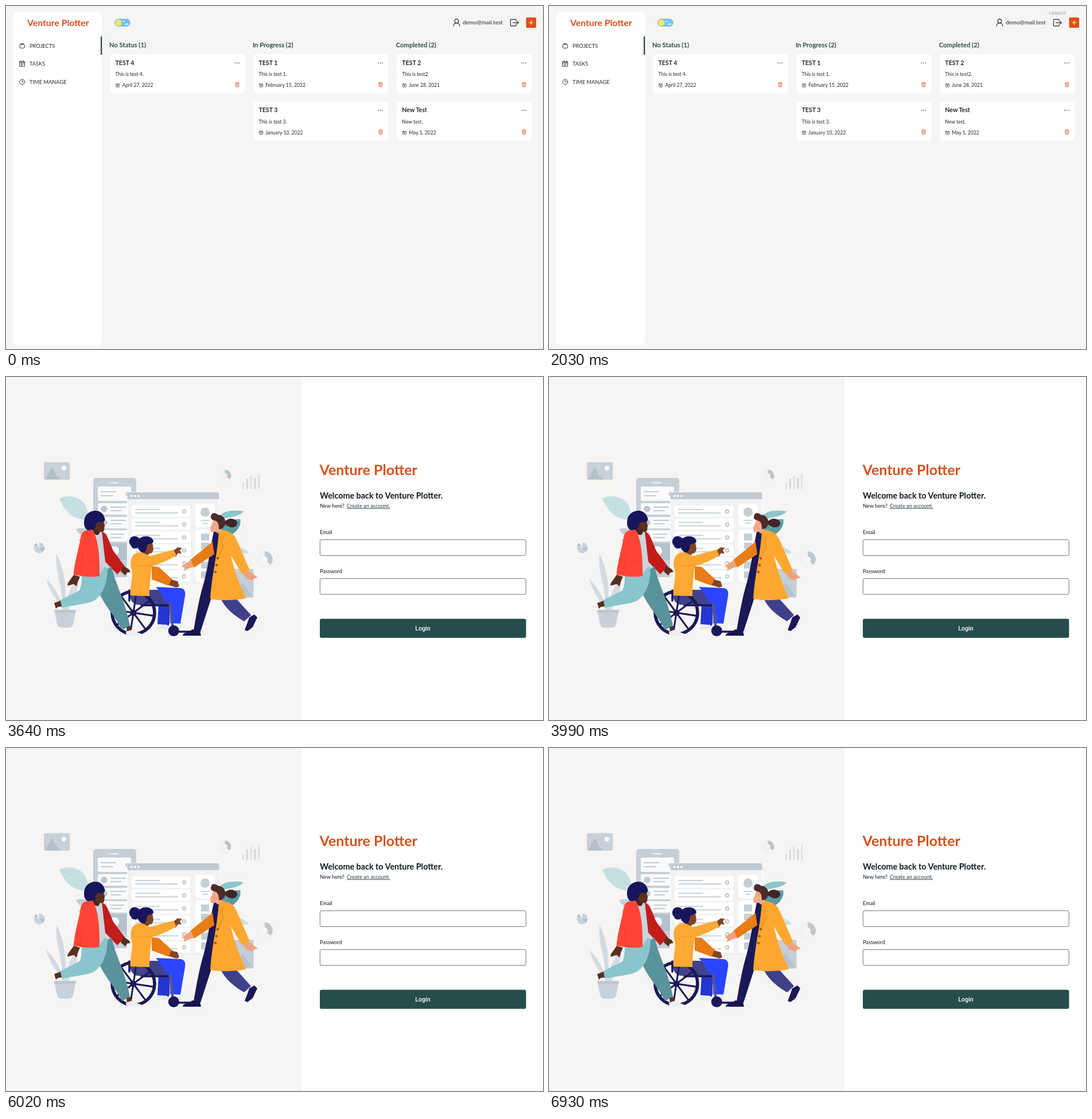
An HTML page that plays this animation: 936x598 px, repeating every 7070 ms.

```html
<!DOCTYPE html>
<html lang="en">
<head>
<meta charset="utf-8">
<title>Venture Plotter</title>
<style>
  html, body { margin: 0; width: 100%; height: 100%; overflow: hidden; background: #f6f5f4; }
  svg { display: block; font-family: Lato, sans-serif; }
  .b { font-weight: 700; }
  .ui { font-family: Roboto, sans-serif; }
  .line { fill: none; stroke-linecap: round; stroke-linejoin: round; }
</style>
</head>
<body>
<svg width="936" height="598" viewBox="0 0 936 598">
  <defs>
    <g id="dots" fill="#4a5258"><circle cx="-3.4" r=".9"/><circle r=".9"/><circle cx="3.4" r=".9"/></g>
    <g id="cal" class="line" stroke="#3c454b" stroke-width=".75">
      <rect x="-3" y="-2.6" width="6" height="5.6" rx=".6"/>
      <path d="M-3-1.2H3M0 0V1.8M-.9.9H.9"/>
    </g>
    <g id="bin" class="line" stroke="#e8634c" stroke-width=".9">
      <path d="M-3.6-2.4H3.6M-1.4-2.6V-4H1.4v1.4M-2.9-2.2L-2.5 4h5l.4-6.2M-1-.6V2.4M1-.6V2.4"/>
    </g>
  </defs>

  <g id="board">
    <rect width="936" height="598" fill="#f6f5f4"/>
    <rect x="12" y="9.5" width="155.3" height="582" rx="9" fill="#fff"/>
    <rect x="165" y="53" width="2.3" height="32" fill="#264c4b"/>
    <text class="b" x="37" y="35" font-size="15.8" fill="#d9501e">Venture Plotter</text>
    <g font-size="9.28" fill="#222b30">
      <text x="41" y="72.5">PROJECTS</text>
      <text x="41" y="104.2">TASKS</text>
      <text x="41" y="135.9">TIME MANAGE</text>
    </g>
    <g class="line" stroke="#2b353a">
      <rect x="24" y="67" width="8.4" height="6.3" rx="1.2"/>
      <path d="M26.2 67v-1.6h4V67"/>
      <path d="M24 96.8h8.4v8.4H24zM24 98.8h8.4M26.2 95.6v2M30.2 95.6v2M26 101h4.4M26 103h3"/>
      <circle cx="28.2" cy="132.4" r="4.4"/>
      <path d="M28.2 129.7v2.9h2.2"/>
    </g>
    <rect x="189.4" y="22.6" width="27" height="13" rx="6.5" fill="#6ec3f8" stroke="#8bb5cc" stroke-width=".7"/>
    <circle cx="196" cy="29.1" r="5.7" fill="#fae36a"/>
    <path d="M203.3 27.4q.3-1.7 1.8-1.3q1.6-.9 2.2 1.3zM207 32.6q.3-1.9 2-1.6q2-1.4 3 .2q1.6 0 1.5 1.4z" fill="#fff"/>
    <g class="line" stroke="#222b30" stroke-width="1.15">
      <circle cx="785.4" cy="26.2" r="3.3"/>
      <path d="M779.9 35q.3-5 5.5-5.3q5.2.3 5.5 5.3M889.2 26v-1.5q0-1.2-1.2-1.2h-7.4q-1.2 0-1.2 1.2v9.2q0 1.2 1.2 1.2h7.4q1.2 0 1.2-1.2V32M883.5 29.1h9.6M890.5 26.6l2.7 2.5-2.7 2.5"/>
    </g>
    <text x="796" y="32.4" font-size="9.95" fill="#222b30">demo@mail.test</text>
    <rect x="906.5" y="20" width="17.5" height="18" rx="2" fill="#e04f14"/>
    <path d="M911.6 29h7.4M915.3 25.3v7.4" stroke="#fff" stroke-width="1.1"/>
    <text id="tip" class="ui" x="871.6" y="15.4" font-size="7.85" fill="#30353a">LOGOUT</text>
    <g id="cols"></g>
  </g>

  <g id="login">
    <rect width="936" height="598" fill="#fff"/>
    <rect width="515" height="598" fill="#f6f5f3"/>

    <!-- backdrop: picture, charts, leaves -->
    <rect x="66" y="148.5" width="45.3" height="30.5" rx="2" fill="#c8d1d9"/>
    <path d="M68 178.500L80 157l11 21.500zM84 178.500l5-6 6 6z" fill="#b3bfca"/>
    <circle cx="101" cy="159" r="4.200" fill="#f7f8f8"/>
    <g id="bars" stroke-width="3"></g>
    <circle cx="381.500" cy="172" r="10" fill="none" stroke="#e6e9eb"/>
    <path d="M381.500 161.500a10.500 10.500 0 0 1 8.500 17l-5-4a5 5 0 0 0-3.500-7.500z" fill="#b9c4ce"/>
    <circle cx="381" cy="172.500" r="4.500" fill="none" stroke="#e0e4e8"/>
    <path d="M58 297.500V288.500a9.300 9.300 0 1 1-8.500 5.500z" fill="#c9d2d9"/>
    <path d="M57 296l-4.500-6.500-4 4zM58 298h9.500a9.500 9.500 0 0 1-3 6.500z" fill="#b3bec9"/>
    <circle cx="451" cy="318" r="13" fill="none" stroke="#e6e9eb" stroke-width="1.200"/>
    <circle cx="451" cy="318" r="8" fill="none" stroke="#eceeef"/>
    <path d="M451 304a14 14 0 0 1 10 23.500l-6-5.500a6 6 0 0 0-4-9.500z" fill="#bec8d1"/>
    <path d="M93 212C107 204 130 208 138 223c5 9 5 17 9 26C126 250 105 243 93 212z" fill="#c6e0e2"/>
    <path d="M93 212c24 10 39 18 54 37" class="line" stroke="#b6d5d8" stroke-width=".8"/>
    <path d="M122 265c12-4 23-1 30 14-13 1-24-1-30-14zM126 284c10-7 20-4 26 2-9 5-18 5-26-2z" fill="#c4ced7"/>
    <path d="M368 247c8-14 25-16 46-13-6 10-27 10-44 15z" fill="#8bc6ca"/>
    <path d="M371 280c-4-18 6-33 37-32 4 13-12 34-37 32z" fill="#579ba2"/>
    <path d="M372 277c9-13 19-21 35-27" class="line" stroke="#84b7bc"/>
    <path d="M400 296c9-1 17 3 23 11-9 3-16 1-23-11z" fill="#c8e2e4"/>
    <rect x="396" y="334.500" width="35.500" height="50" rx="2" fill="#c5ced7"/>
    <path d="M398 382l14-24 18 24z" fill="#b7c2cc"/>
    <path d="M99 406C87 388 77 376 70 352c14 12 22 29 28 43 0-29-13-54-10-87 14 27 17 56 16 82 6-15 11-28 23-41-1 22-9 40-18 57z" fill="#d6dce1"/>
    <path d="M90 318q11 42 11 85M73 359q19 23 27 43" class="line" stroke="#c8d1d8"/>
    <path d="M84 406h38l-5 25q-2 6-8 6H97q-6 0-8-6z" fill="#c8d1d9"/>
    <path d="M84 406h38l-1 5H85z" fill="#bcc7d0"/>

    <!-- phone and window -->
    <rect x="152" y="176" width="75" height="173" rx="5" fill="#c5cfd7"/>
    <path d="M184 184.500h11" class="line" stroke="#f7f8f9" stroke-width="2.200"/>
    <circle cx="180.500" cy="184.500" r="1.200" fill="#f7f8f9"/>
    <g fill="#fafafa">
      <rect x="160" y="191" width="58" height="25" rx="2"/>
      <rect x="160" y="220" width="58" height="20" rx="2"/>
      <rect x="160" y="244" width="58" height="20" rx="2"/>
      <rect x="160" y="267" width="58" height="20" rx="2"/>
    </g>
    <rect x="160" y="290" width="58" height="29" fill="#b5c1cb"/>
    <circle cx="189" cy="303" r="8" fill="#fafafa"/>
    <path d="M166 200h25M166 207h20M183 227h25M183 233h18M183 250h25M183 256h18M183 274h22M183 280h18" class="line" stroke="#c1cbd4" stroke-width="2.200"/>
    <g fill="#bec9d2"><circle cx="171" cy="230" r="5.800"/><circle cx="171" cy="254" r="5.800"/><circle cx="171" cy="277" r="5.800"/><circle cx="212" cy="204" r="3.500"/></g>
    <rect x="211.500" y="201" width="160" height="162" rx="3" fill="#f1f2f3" stroke="#fff"/>
    <path d="M211.500 213v-9q0-3 3-3h154q3 0 3 3v9z" fill="#c0cad3"/>
    <g fill="#fff"><circle cx="219" cy="207.500" r="1.900"/><circle cx="225" cy="207.500" r="1.900"/><circle cx="231" cy="207.500" r="1.900"/></g>
    <g id="rows"></g>
    <rect x="330" y="221" width="34" height="41" rx="5" fill="#fff"/>
    <rect x="330" y="266" width="34" height="91" rx="5" fill="#fff"/>
    <circle cx="347" cy="235.500" r="8" fill="#c4ced6"/>
    <path d="M340 250h14M343 255h8" class="line" stroke="#ced6dc" stroke-width="2"/>
    <path d="M340 273h14v12h-14zM340 289h14v11h-14zM340 305h14v12h-14zM340 322h14v12h-14zM340 339h14v12h-14z" fill="#c4ced6"/>

    <!-- wheelchair user -->
    <path d="M266 394l20-4-1 40-2 4-19-3z" fill="#2336d2"/>
    <path d="M215 371h47l22 2 4 24h-59q-14-2-14-26z" fill="#41428c"/>
    <path d="M261 366l43 2q10 1 8 14l-8 48-18-1 1-32-10-6q-6-14-16-25z" fill="#2b44ff"/>
    <path d="M264 431l17 1 3 8h-22zM286 432l17-1 3 8-20 1z" fill="#e8ebee"/>
    <g class="line" stroke="#1b1857">
      <circle cx="222" cy="411" r="37" stroke-width="5.600"/>
      <path id="spokes" stroke-width="3"/>
      <path d="M215 372v18M236 398h50M292 444h28" stroke-width="3.600"/>
    </g>
    <path d="M286 396l5 44" class="line" stroke="#55568b" stroke-width="4.500"/>
    <circle cx="222" cy="411" r="5.500" fill="#1b1857"/>
    <circle cx="292.300" cy="442.500" r="9.500" fill="#1b1857"/>
    <path d="M249 327l12 2 22 22v14l-34 2z" fill="#fafafa"/>
    <path d="M254 330l12 1 24 22-6 11-30-11z" fill="#ea7c15"/>
    <path d="M288 353l11 3 3 9-5 2-13-4z" fill="#804429"/>
    <path d="M290 304l9-7 8 1-4 4 3 6-6-1-4 6-6-1z" fill="#804429"/>
    <path d="M238 295h13l-1 13q-6 6-13 0z" fill="#6d3821"/>
    <path d="M222 310q6-5 16-4l13 6 41-11 5 10q-17 11-43 19c-2 17-4 36-4 52l-33-1c-2-13 5-31 2-45-3-10-2-19 3-26z" fill="#fea935"/>
    <path d="M230 330l25-2" class="line" stroke="#ed911f"/>
    <path d="M241 286l13-1 2 8 1 8-3 6-7 1-8-6z" fill="#804429"/>
    <path d="M233 281c8-6 23-4 24 6-2 4-8 3-11 6-1 9-3 13-8 13-6-2-10-9-9-16z" fill="#17155c"/>
    <path d="M217 281c4-5 11-4 15 0 4 6 2 13-3 17-5 2-10 1-11-4-4-4-4-9-1-13z" fill="#17155c"/>

    <!-- walker in red -->
    <path d="M152 268l14-1c8 15 13 37 13 66l-18 4z" fill="#cbd4dc"/>
    <path d="M167 269c10 4 14 21 20 34l20 27-13 14-21-22z" fill="#c21d1b"/>
    <path d="M204 329l10 6 3 5-6 1-3 5-8-7z" fill="#5b2f20"/>
    <path d="M118 345l11 3-4 9-2 8-5-4-11 3 1-5z" fill="#5b2f20"/>
    <path d="M160 347l24-17c6 30 25 62 32 104l-14 7c-11-24-33-44-43-73z" fill="#5a939b"/>
    <path d="M132 345l31-1 9-13 5 2c0 31-12 53-28 59-15 5-35 6-51 10l-5-12 35-18c4-9 4-18 4-27z" fill="#8ac5cd"/>
    <path d="M95 390l2 10-7 1-3 3-3-10z" fill="#5b2f20"/>
    <path d="M152 260l13 1-2 11c-2 6-9 4-13-5z" fill="#482318"/>
    <path d="M155 247l14 1 3 11-1 8q-1 4-8 3l-8-4z" fill="#5b2f20"/>
    <path d="M172 246c2 5-3 8-8 7-5-1-7 3-8 8s-6 9-11 7c-6-1-9-7-9-14 0-12 7-20 19-21 10 0 15 6 17 13z" fill="#17155c"/>
    <path d="M138 268l13-2c9 15 13 45 12 81-15 3-31 0-45-2 0-16 8-42 12-65 1-6 3-10 8-12z" fill="#fe4535"/>
    <path d="M145 324l10-3M134 306l-4 40" class="line" stroke="#e5382c" stroke-width=".9"/>
    <path d="M210 436l7-2 2 9-8 2z" fill="#5b2f20"/>
    <path d="M209 444l9-3 8 3 11 4 1 3-28 1z" fill="#eceeef"/>

    <!-- walker in yellow -->
    <path d="M374 386l25-2 28 31-12 11c-15-9-32-21-41-40z" fill="#403f8a"/>
    <path d="M424 419l9-5 5 5-8 17-9 7-5-2 5-13z" fill="#1b1857"/>
    <path d="M362 270l10-2 3 102-18 18-18 56-12-2c5-29 10-58 18-84 8-31 11-60 17-88z" fill="#1b1857"/>
    <path d="M325 440l13 3 2 8h-32q0-5 9-6z" fill="#17144f"/>
    <path d="M360 287l3 22-35 23-7-13z" fill="#e87c16"/>
    <path d="M323 319l4 12-9 3-8 4 1-6-5-1 7-6z" fill="#efa17f"/>
    <path d="M410 337l12 1 8 5 9 7-6 1-4 4-11-4z" fill="#efa17f"/>
    <path d="M372 266c14 1 24 5 30 18l23 53-14 6-19-32c5 25 15 50 26 75q-32 6-62 1c3-45 13-78 15-120z" fill="#fea730"/>
    <path d="M371 267l9 17-5 5 3 9-14 28c5-21 7-42 7-59z" fill="#f8a128"/>
    <path d="M380 276l-4 11 3 8-9 20" class="line" stroke="#d98a25"/>
    <g fill="#a8591f"><circle cx="369" cy="316" r="2.300"/><circle cx="367" cy="328" r="2.300"/><circle cx="365" cy="340" r="2.300"/></g>
    <path d="M362 247l15 5-2 17-6 4-3-3-9 0-1-7 3-7z" fill="#f2a987"/>
    <path d="M381 252q8-7 16-4 7 3 6 8-2 7-11 6-5-1-11-6z" fill="#3f2527"/>
    <path d="M357 244c1-8 7-8 12-4 9 1 15 7 13 16-1 6-6 10-11 9 0-7-1-14-8-15-3-1-6-2-6-6z" fill="#4d2b2a"/>

    <text class="b" x="546.600" y="171" font-size="25" fill="#d9501e">Venture Plotter</text>
    <g fill="#101a1e" font-size="9.200">
      <text class="b" x="547" y="211.500" font-size="14.350">Welcome back to Venture Plotter.</text>
      <text x="547" y="227.800">New here?</text>
      <text x="594" y="227.800" fill="#2a3a40" text-decoration="underline">Create an account.</text>
      <text x="547" y="274.300">Email</text>
      <text x="547" y="342">Password</text>
    </g>
    <g fill="#fff" stroke="#5f6365" stroke-width=".9">
      <rect x="547.300" y="283.700" width="358.900" height="27.600" rx="2.600"/>
      <rect x="547.300" y="351.400" width="358.900" height="27.600" rx="2.600"/>
    </g>
    <rect x="547" y="421.600" width="359.500" height="33.200" rx="3.400" fill="#264d4b"/>
    <text class="ui" x="726.400" y="442.200" font-size="10.600" font-weight="500" fill="#fff" text-anchor="middle">Login</text>
  </g>
</svg>
<script>
  const LOOP = 7070, STEP = 70, TIP_AT = 2030, LOGIN_AT = 3640;
  const $ = id => document.getElementById(id);

  const columns = [
    ["No Status (1)", ["TEST 4", "This is test 4.", "April 27, 2022"]],
    ["In Progress (2)", ["TEST 1", "This is test 1.", "February 15, 2022"],
      ["TEST 3", "This is test 3.", "January 10, 2022"]],
    ["Completed (2)", ["TEST 2", "This is test2.", "June 28, 2021"],
      ["New Test", "New test.", "May 1, 2022"]]
  ];

  function card([title, note, date], x, y) {
    return `<g transform="translate(${x} ${y})" fill="#222b33">
      <rect x="1.5" width="235" height="68.3" rx="6" fill="#fff"/>
      <text class="b" x="10.5" y="18.7" font-size="10.6">${title}</text>
      <text x="10.5" y="38" font-size="8.6">${note}</text>
      <text x="22.4" y="57" font-size="8.6">${date}</text>
      <use href="#cal" x="14.7" y="54.3"/>
      <use href="#dots" x="222.7" y="15.3"/>
      <use href="#bin" x="223" y="53"/>
    </g>`;
  }

  $("cols").innerHTML = columns.map(([name, ...cards], i) => {
    const x = 180 + i * 249.9;
    return `<text class="b" x="${x}" y="71.8" font-size="11.2" fill="#284b4b">${name}</text>` +
      cards.map((c, j) => card(c, x, 84 + j * 82.5)).join("");
  }).join("");

  $("rows").innerHTML = [0, 1, 2, 3, 4, 5].map(i => {
    const y = 224 + i * 22.6;
    return `<rect x="219" y="${y}" width="102.5" height="19.8" rx="2" fill="#fff"/>
      <path d="M226 ${y + 7}h42M226 ${y + 13}h73" class="line" stroke="#c8d1d9" stroke-width="2"/>
      <circle cx="310.5" cy="${y + 10.5}" r="2.8" fill="none" stroke="#bcc7d0" stroke-width="2"/>`;
  }).join("");

  $("bars").innerHTML = [184, 177, 172, 176, 169].map((top, i) =>
    `<path d="M${413.5 + i * 6.8} ${top}V195.5" stroke="${i % 2 ? "#d0d7dd" : "#dde2e5"}"/>`).join("");

  $("spokes").setAttribute("d", [0, 1, 2, 3, 4, 5, 6, 7].map(i => {
    const a = i * Math.PI / 4 + 0.15;
    return `M222 411L${222 + 35 * Math.cos(a)} ${411 + 35 * Math.sin(a)}`;
  }).join(""));

  function draw(ms) {
    const t = ms % LOOP, onLogin = t >= LOGIN_AT;
    $("login").style.display = onLogin ? "" : "none";
    $("board").style.display = onLogin ? "none" : "";
    const n = Math.floor((t - TIP_AT) / STEP);
    $("tip").setAttribute("opacity", n < 0 ? 0 : Math.min(1, 0.55 + n * 0.16));
  }

  const start = performance.now();
  function tick() {
    draw(performance.now() - start);
    requestAnimationFrame(tick);
  }
  tick();
</script>
</body>
</html>
```
